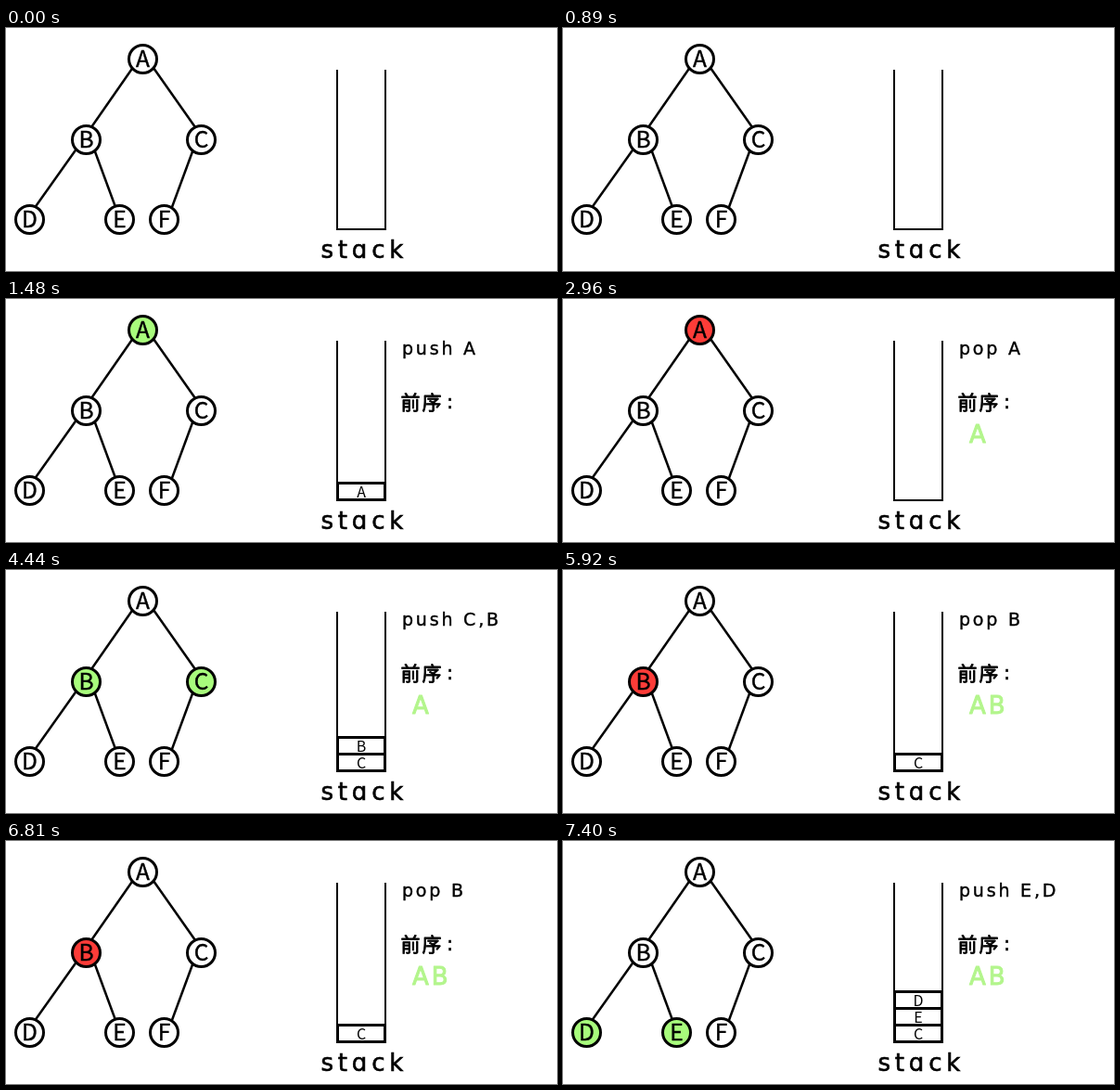
Recreate the animation shown at these times as an HTML page with a canvas. Size 594x262 px, loop 8 s.

```html
<!DOCTYPE html>
<html lang="zh">
<head>
<meta charset="utf-8">
<title>Preorder traversal with a stack</title>
<style>
html, body { margin: 0; width: 100%; height: 100%; overflow: hidden; background: #fff; }
canvas { display: block; width: 594px; height: 262px; }
</style>
</head>
<body>
<canvas id="stage"></canvas>
<script>
const W = 594, H = 262, LOOP = 8000, STEP = 1480;
const GREEN = '#a8fc7c', RED = '#fd3c38', OUTPUT = '#b3f58c';
const LATIN = '"DejaVu Sans", sans-serif';
const HAN = '"Noto Sans CJK SC", "Noto Sans CJK", sans-serif';

const canvas = document.getElementById('stage');
const ctx = canvas.getContext('2d');
const scale = window.devicePixelRatio || 1;
canvas.width = W * scale;
canvas.height = H * scale;
ctx.scale(scale, scale);

const nodes = {
  A: [147.5, 33.5], B: [86.5, 120.5], C: [210.5, 120.5],
  D: [25.5, 206.5], E: [122.5, 206.5], F: [170.5, 206.5]
};

// Edges meet the circles off-centre, so both ends are given.
const edges = [
  [[136.5, 43], [92, 107]],
  [[159, 43], [204, 107]],
  [[75.5, 131], [31.5, 193]],
  [[95.5, 132], [118, 193]],
  [[201.5, 132], [179, 193]]
];

// Stack contents run from bottom to top.
const steps = [
  { action: '', lit: '', stack: '', output: null },
  { action: 'push A', lit: 'A', color: GREEN, stack: 'A', output: '' },
  { action: 'pop A', lit: 'A', color: RED, stack: '', output: 'A' },
  { action: 'push C,B', lit: 'BC', color: GREEN, stack: 'CB', output: 'A' },
  { action: 'pop B', lit: 'B', color: RED, stack: 'C', output: 'AB' },
  { action: 'push E,D', lit: 'DE', color: GREEN, stack: 'CED', output: 'AB' }
];

function line(width, ...points) {
  ctx.lineWidth = width;
  ctx.beginPath();
  points.forEach(([x, y]) => ctx.lineTo(x, y));
  ctx.stroke();
}

function text(str, x, y, size, { gap = 0, align = 'left', color = '#000', weight = 0, font = LATIN } = {}) {
  ctx.font = `${size}px ${font}`;
  ctx.letterSpacing = gap + 'px';
  ctx.textAlign = align;
  ctx.fillStyle = ctx.strokeStyle = color;
  ctx.fillText(str, x, y);
  if (weight) {
    ctx.lineWidth = weight;
    ctx.strokeText(str, x, y);
  }
  ctx.strokeStyle = '#000';
}

function drawTree({ lit, color }) {
  for (const ends of edges) line(2.5, ...ends);
  for (const [name, [x, y]] of Object.entries(nodes)) {
    ctx.beginPath();
    ctx.arc(x, y, 15, 0, Math.PI * 2);
    ctx.fillStyle = lit.includes(name) ? color : '#fff';
    ctx.fill();
    ctx.lineWidth = 3;
    ctx.stroke();
    text(name, x, y + 8.8, 24.5, { align: 'center', weight: 0.4, font: HAN });
  }
}

function drawStack({ stack }) {
  line(2, [357, 45], [357, 217], [409, 217], [409, 45]);
  [...stack].forEach((name, i) => {
    const y = 198.5 - i * 18;
    ctx.lineWidth = 3;
    ctx.strokeRect(357.5, y, 51, 18);
    text(name, 383, y + 15, 16, { align: 'center', font: HAN });
  });
  // Single-storey a, as in a rounded face.
  text('st\u0251ck', 339.5, 248, 26, { gap: 4.8, weight: 0.6 });
}

function drawNotes({ action, output }) {
  text(action, 427, 60, 19, { gap: 2.8, weight: 0.4 });
  if (output === null) return;
  text('前序', 425.5, 118.8, 21, { gap: 2, weight: 0.8, font: HAN });
  text(':', 475, 117.5, 21, { weight: 0.5 });
  text(output, 438, 155, 26, { gap: 3, color: OUTPUT, weight: 1 });
}

function draw(time) {
  const step = steps[Math.floor((time % LOOP) / STEP)];
  ctx.fillStyle = '#fff';
  ctx.fillRect(0, 0, W, H);
  ctx.strokeStyle = '#000';
  ctx.lineJoin = 'miter';
  drawTree(step);
  drawStack(step);
  ctx.lineJoin = 'round';
  drawNotes(step);
}

const start = performance.now();
function tick() {
  draw(performance.now() - start);
  requestAnimationFrame(tick);
}
tick();
</script>
</body>
</html>
```
